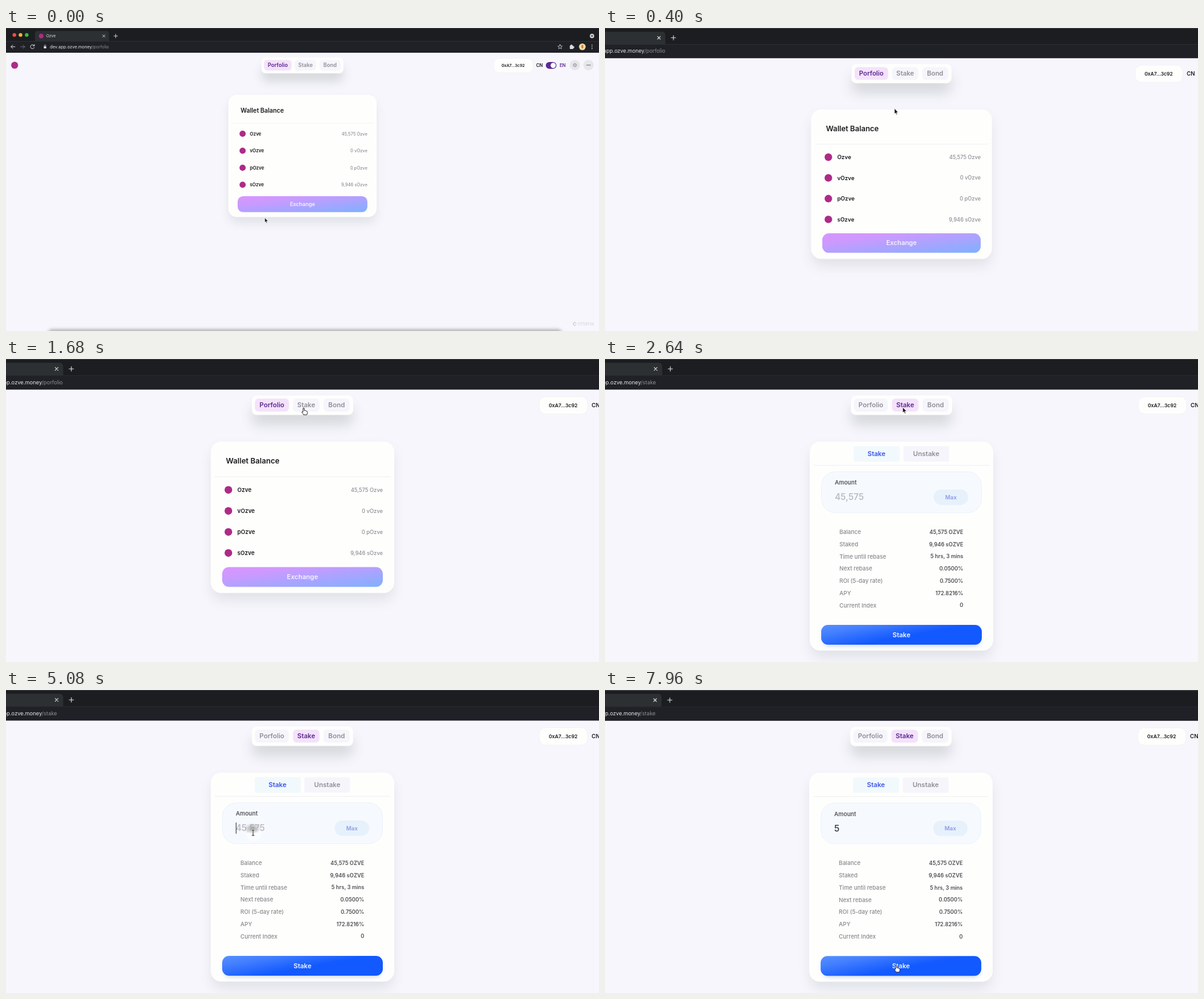
Recreate the animation shown at these times as an HTML page. Size 960 by 490 pixels, loop 8000 ms.

```html
<!DOCTYPE html>
<html lang="en">
<head>
<meta charset="utf-8">
<title>Wallet</title>
<style>
  html, body { margin: 0; width: 100%; height: 100%; overflow: hidden; background: #f6f6fc; }
  svg { display: block; width: 960px; height: 490px; }
  text { font-family: Inter, "Open Sans", sans-serif; white-space: pre; }
</style>
</head>
<body>
<svg id="stage" viewBox="0 0 960 490">
  <defs>
    <filter id="soft" x="-50%" y="-150%" width="200%" height="400%"><feGaussianBlur stdDeviation="10"/></filter>
    <filter id="near" x="-50%" y="-150%" width="200%" height="400%"><feGaussianBlur stdDeviation="3"/></filter>
    <linearGradient id="pink" x1="0" y1="0" x2="1" y2="1">
      <stop offset="0" stop-color="#d995ff"/><stop offset=".25" stop-color="#cd99ff"/><stop offset="1" stop-color="#7fb0ff"/>
    </linearGradient>
    <linearGradient id="blue" x1="0" y1="0" x2=".9" y2=".6">
      <stop offset="0" stop-color="#5890ff"/><stop offset=".25" stop-color="#4480ff"/><stop offset=".7" stop-color="#1259ff"/>
    </linearGradient>
    <radialGradient id="smudge">
      <stop offset="0" stop-color="#777" stop-opacity=".7"/><stop offset=".5" stop-color="#888" stop-opacity=".4"/><stop offset="1" stop-color="#999" stop-opacity="0"/>
    </radialGradient>
    <radialGradient id="glow">
      <stop offset="0" stop-color="#fff" stop-opacity=".75"/><stop offset=".85" stop-color="#fff" stop-opacity=".6"/><stop offset="1" stop-color="#fff" stop-opacity="0"/>
    </radialGradient>
  </defs>
</svg>
<script>
const LOOP = 8000, STEP = 40, MIN_SCALE = 1 / 1.2375;
const INK = '#1b1b1d', GREY = '#8f8f95', PURPLE = '#5c2a91', PAPER = '#fefefd', BRAND = '#ae2a88';
const svg = document.getElementById('stage');

function add(parent, tag, attrs = {}) {
  const el = document.createElementNS('http://www.w3.org/2000/svg', tag);
  for (const key in attrs) el.setAttribute(key, attrs[key]);
  return parent.appendChild(el);
}
const group = parent => add(parent, 'g');
const rect = (g, x, y, w, h, r, fill, more) =>
  add(g, 'rect', { x, y, width: w, height: h, rx: r, fill, ...more });
const disc = (g, cx, cy, r, fill, more) => add(g, 'circle', { cx, cy, r, fill, ...more });
const line = (g, d, stroke, width = 1.2, more) =>
  add(g, 'path', { d, stroke, fill: 'none', 'stroke-width': width, 'stroke-linecap': 'round', 'stroke-linejoin': 'round', ...more });

// y is the middle of the capitals
function label(g, x, y, str, size, fill, anchor = 'start', weight = 600) {
  const el = add(g, 'text', { x, y: y + size * 0.36, 'font-size': size, fill, 'text-anchor': anchor, 'font-weight': weight });
  el.textContent = str;
  return el;
}

const world = group(svg);

function browser() {
  const g = group(world), light = '#dcdde0';
  rect(g, -120, 0, 1200, 27, 0, '#1c1d21');
  rect(g, -120, 0, 1200, 1, 0, '#3a3b3f');
  rect(g, -120, 26.5, 1200, 23, 0, '#202126');
  add(g, 'path', { d: 'M-56 26.5V12q0-6 6-6H86.500q6 0 6 6V26.500z', fill: '#2d3033' });
  rect(g, -120, 26.5, 1200, .6, 0, '#303136');
  ['#fc4b45', '#f5b52e', '#2ac23d'].forEach((c, i) => disc(g, -97.3 + 12.4 * i, 14, 3.7, c));
  disc(g, -43.5, 16, 4.6, BRAND);
  label(g, -33.6, 16, 'Ozve', 7.8, light, 'start', 400);
  line(g, 'M79.700 13.700l4.600 4.600m0-4.600l-4.600 4.600', light, 1.1);
  line(g, 'M102.200 16h7.200m-3.600-3.600v7.200', light, 1.1);
  disc(g, 1060, 16, 4.4, '#c9cacd');
  add(g, 'path', { d: 'M1057.800 15h4.400l-2.200 2.700z', fill: '#1c1d21' });

  line(g, 'M-96 37.500h-8m3.500-3.500l-3.500 3.500l3.500 3.500', light);
  line(g, 'M-84.500 37.500h8m-3.500-3.500l3.500 3.500l-3.500 3.500', '#6c6d72');
  line(g, 'M-57.500 35.500a4 4 0 1 0 .2 3.500M-57 33v2.800h-2.800', light);
  rect(g, -38.3, 36.6, 5, 4.2, .6, light);
  line(g, 'M-37.400 36.500v-1.200a1.600 1.600 0 0 1 3.200 0v1.200', light, .8);
  line(g, 'M996 33l1.300 3 3.200.3-2.400 2.100.7 3.200-2.800-1.700-2.800 1.700.7-3.200-2.400-2.100 3.200-.3z', light, .9);
  rect(g, 1015.5, 35, 7, 7, 1, light);
  disc(g, 1018.7, 34.6, 1.6, light);
  disc(g, 1023, 38.5, 1.6, light);
  disc(g, 1040.6, 37.5, 6.7, '#f0dca6');
  rect(g, 1038.8, 33.8, 3.6, 7, 1.8, '#d8762f');
  [34, 37.5, 41].forEach(y => disc(g, 1060, y, 1, light));

  const url = label(g, -26, 37.5, 'dev.app.ozve.money', 8.6, '#e6e7ea', 'start', 400);
  const path = add(url, 'tspan', { fill: '#8d8f94' });
  return path;
}

function header() {
  const g = group(world);
  disc(g, -96.7, 74.5, 7, BRAND);
  rect(g, 398, 76, 164, 31, 12, '#59635f', { opacity: .2, filter: 'url(#soft)' });
  rect(g, 398, 59, 164, 31.5, 8, PAPER);
  const items = [['Porfolio', 403, 55], ['Stake', 464.5, 43], ['Bond', 514, 42.5]].map(([name, x, w]) => ({
    box: rect(g, x, 64, w, 21, 6, '#f6f5fc'),
    text: label(g, x + w / 2, 74.3, name, 10.7, GREY, 'middle')
  }));
  rect(g, 863.5, 61, 78, 28, 10, PAPER, { stroke: '#f0f0f4', 'stroke-width': .7 });
  label(g, 902, 75, '0xA7...3c92', 8, INK, 'middle');
  label(g, 948, 74.5, 'CN', 9, INK);
  rect(g, 967.5, 68, 21.2, 13.6, 6.8, PURPLE);
  disc(g, 982.2, 74.8, 5.2, '#fff');
  label(g, 995, 74.5, 'EN', 9, PURPLE);
  [1025.7, 1053].forEach(x => disc(g, x, 74.3, 10.5, '#e7e7eb'));
  disc(g, 1025.7, 74.3, 2.4, 'none', { stroke: '#86868c', 'stroke-width': 1.2 });
  disc(g, 1025.7, 74.3, 3.8, 'none', { stroke: '#86868c', 'stroke-width': 1, 'stroke-dasharray': '1.5 1.48' });
  [-3, 0, 3].forEach(d => disc(g, 1053 + d, 74.3, 1, '#3a3a3f'));
  line(g, 'M1028 590.500a3 3 0 1 0 .2 3', '#a9a9b0', 1);
  label(g, 1031, 592, '11759734', 7.6, '#cfcfd6', 'start', 400);
  rect(g, -30, 603, 1030, 20, 8, '#777', { opacity: .55, filter: 'url(#near)' });
  return items;
}

function card(bottom) {
  const g = group(world), h = bottom - 133.5;
  rect(g, 333, 145, 294, h, 17, '#59635f', { opacity: .13, filter: 'url(#soft)' });
  rect(g, 331.5, 133.5, 297, h, 17, PAPER);
  return g;
}
const divider = (g, y) => rect(g, 338, y, 284, 1, 0, '#f0f0f3');

function wallet() {
  const g = card(378.5);
  label(g, 356, 165, 'Wallet Balance', 12.2, INK);
  divider(g, 190);
  [['', '45,575'], ['v', '0'], ['p', '0'], ['s', '9,946']].forEach(([prefix, sum], i) => {
    const y = 211.7 + 34 * i, name = prefix + 'Ozve';
    disc(g, 360, y, 6.2, BRAND);
    label(g, 374.5, y, name, 9.2, INK);
    label(g, 610, y, sum + ' ' + name, 8.6, GREY, 'end', 500);
  });
  rect(g, 350, 336.5, 260, 32, 11, 'url(#pink)');
  label(g, 480, 352.2, 'Exchange', 10.6, '#f6f0ff', 'middle');
  return g;
}

function stake() {
  const g = card(471.5);
  rect(g, 402.5, 141, 74.5, 25, 3, '#f1f9fd');
  label(g, 439.5, 153.3, 'Stake', 10.7, '#3c55ea', 'middle');
  rect(g, 483, 141, 74, 25, 3, '#f6f5fc');
  label(g, 520, 153.3, 'Unstake', 10.7, GREY, 'middle');
  divider(g, 171.5);
  rect(g, 350.5, 182.5, 259, 66, 22, '#f6faff', { stroke: '#ecf2fa' });
  label(g, 372, 200, 'Amount', 9.3, '#55555a');
  rect(g, 532, 211, 56, 25, 12.5, '#e7f1fb');
  label(g, 560, 223.5, 'Max', 9, '#8b98ea', 'middle');
  const hint = label(g, 372, 223.4, '45,575', 14, '#bdbdc2');
  const typed = label(g, 372, 223.4, '5', 14, '#46464c');
  const caret = rect(g, 372, 214.3, 1, 18.2, 0, '#333338');
  [
    ['Balance', '45,575 OZVE'], ['Staked', '9,946 sOZVE'], ['Time until rebase', '5 hrs, 3 mins'],
    ['Next rebase', '0.0500%'], ['ROI (5-day rate)', '0.7500%'], ['APY', '172.8216%'], ['Current Index', '0']
  ].forEach(([name, value], i) => {
    const y = 279.7 + 19.75 * i;
    label(g, 379.5, y, name, 9.2, '#88888d', 'start', 500);
    label(g, 580, y, value, 8.6, '#4f4f54', 'end');
  });
  rect(g, 352, 434, 256, 30, 11, '#2b5fd0', { opacity: .25, filter: 'url(#near)' });
  rect(g, 350, 430, 260, 32, 11, 'url(#blue)');
  label(g, 480, 445.8, 'Stake', 10.6, '#f2f6ff', 'middle');
  return { g, hint, typed, caret };
}

function pointer() {
  const g = group(world), ripple = group(g);
  disc(ripple, 1, 1, 13, 'url(#glow)');
  add(ripple, 'ellipse', { cx: -1, cy: -7, rx: 14, ry: 9, fill: 'url(#smudge)' });
  const edge = { stroke: '#fff', 'stroke-width': .7, 'stroke-linejoin': 'round' };
  const arrow = add(g, 'path', { d: 'M0 0V9l2-1.800L3.300 10.300l1.500-.6L3.500 6.700h2.900z', fill: '#111', ...edge });
  const hand = add(g, 'path', {
    d: 'M-1.100.7q1.100-1.500 2 0V4.400q1.400-.8 1.800.4q1.300-.6 1.700.6q1.500-.3 1.500 1V8q0 1.800-1 3.200H-.4Q-1-.0 -1 9.600L-3.200 6.800q.6-1.500 2.100-.1z'
      .replace('Q-1-.0 -1 9.600', 'Q-.6 10.300-1.300 9.400'),
    fill: '#fff', stroke: '#151515', 'stroke-width': .9, 'stroke-linejoin': 'round'
  });
  const beam = group(g), d = 'M-1.600-4.500Q0-4.500 0-3.500Q0-4.500 1.600-4.500M0-3.500V3.500M-1.600 4.500Q0 4.500 0 3.500Q0 4.500 1.600 4.500';
  line(beam, d, '#fff', 1.9);
  line(beam, d, '#151515', .95);
  return { g, ripple, shapes: { arrow, hand, beam } };
}

const path = browser(), tabs = header(), walletCard = wallet(), form = stake(), mouse = pointer();

const SWAP = 1720, TYPED = 6160;
const CLICKS = [1480, 5080], CLICK_LENGTH = 120;
const MOVES = [ // time, x, y
  [20, 404.5, 380], [560, 482, 79], [2280, 482, 79], [2440, 487, 72], [2600, 482, 78], [2680, 482, 78],
  [3080, 446, 149], [4360, 446, 149], [5040, 400, 231], [7200, 400, 231], [7960, 472.4, 444.7]
];
const SHAPES = [
  [0, 'arrow'], [520, 'hand'], [2320, 'arrow'], [3040, 'hand'], [4160, 'arrow'], [4720, 'beam'],
  [5640, ''], [7240, 'beam'], [7400, 'arrow'], [7880, 'hand']
];
const CARET = [[0, 0], [5040, 1], [5560, 0], [6080, 1], [6640, 0], [7200, 1], [7680, 0]];

const ramp = (t, a, b) => Math.min(1, Math.max(0, (t - a) / (b - a)));
const easeInOut = (p, n) => p < .5 ? 2 ** (n - 1) * p ** n : 1 - 2 ** (n - 1) * (1 - p) ** n;
const at = (table, t) => table.reduce((value, row) => t >= row[0] ? row[1] : value, table[0][1]);
const show = (el, on) => el.setAttribute('visibility', on ? 'inherit' : 'hidden');
const mix = (a, b, k) => `color-mix(in srgb, ${b} ${k * 100}%, ${a})`;

function position(t) {
  let i = 0;
  while (i < MOVES.length - 2 && t >= MOVES[i + 1][0]) i++;
  const [t0, x0, y0] = MOVES[i], [t1, x1, y1] = MOVES[i + 1];
  const p = easeInOut(ramp(t, t0, t1), 2);
  return [x0 + (x1 - x0) * p, y0 + (y1 - y0) * p];
}

function draw(t) {
  const scale = MIN_SCALE + (1 - MIN_SCALE) * easeInOut(ramp(t, 0, 540), 3);
  const pan = ramp(t, 7760, 7960) ** 2;
  world.setAttribute('transform', `translate(${480 - .9 * pan} ${.3 * pan}) scale(${scale}) translate(-480 0)`);

  const staking = t >= SWAP;
  path.textContent = staking ? '/stake' : '/porfolio';
  show(walletCard, !staking);
  show(form.g, staking);
  const k = ramp(t, SWAP - 40, SWAP + 200);
  [1 - k, k, 0].forEach((on, i) => {
    tabs[i].box.style.fill = mix('#f6f5fc', '#f4e2fb', on);
    tabs[i].text.style.fill = mix(GREY, PURPLE, on);
  });

  const typed = t >= TYPED;
  show(form.hint, staking && !typed);
  show(form.typed, typed);
  show(form.caret, at(CARET, t));
  form.caret.setAttribute('x', typed ? 380.8 : 372);

  const [x, y] = position(t), shape = at(SHAPES, t);
  mouse.g.setAttribute('transform', `translate(${x} ${y})`);
  mouse.g.setAttribute('opacity', t < 7200 ? 1 - ramp(t, 5240, 5640) : 1);
  for (const name in mouse.shapes) show(mouse.shapes[name], name === shape);
  show(mouse.ripple, CLICKS.some(c => t >= c && t < c + CLICK_LENGTH));
}

const start = performance.now();
function frame(now) {
  const t = Math.max(0, now - start) % LOOP;
  draw(Math.floor(t / STEP) * STEP);
  requestAnimationFrame(frame);
}
draw(0);
requestAnimationFrame(frame);
</script>
</body>
</html>
```
